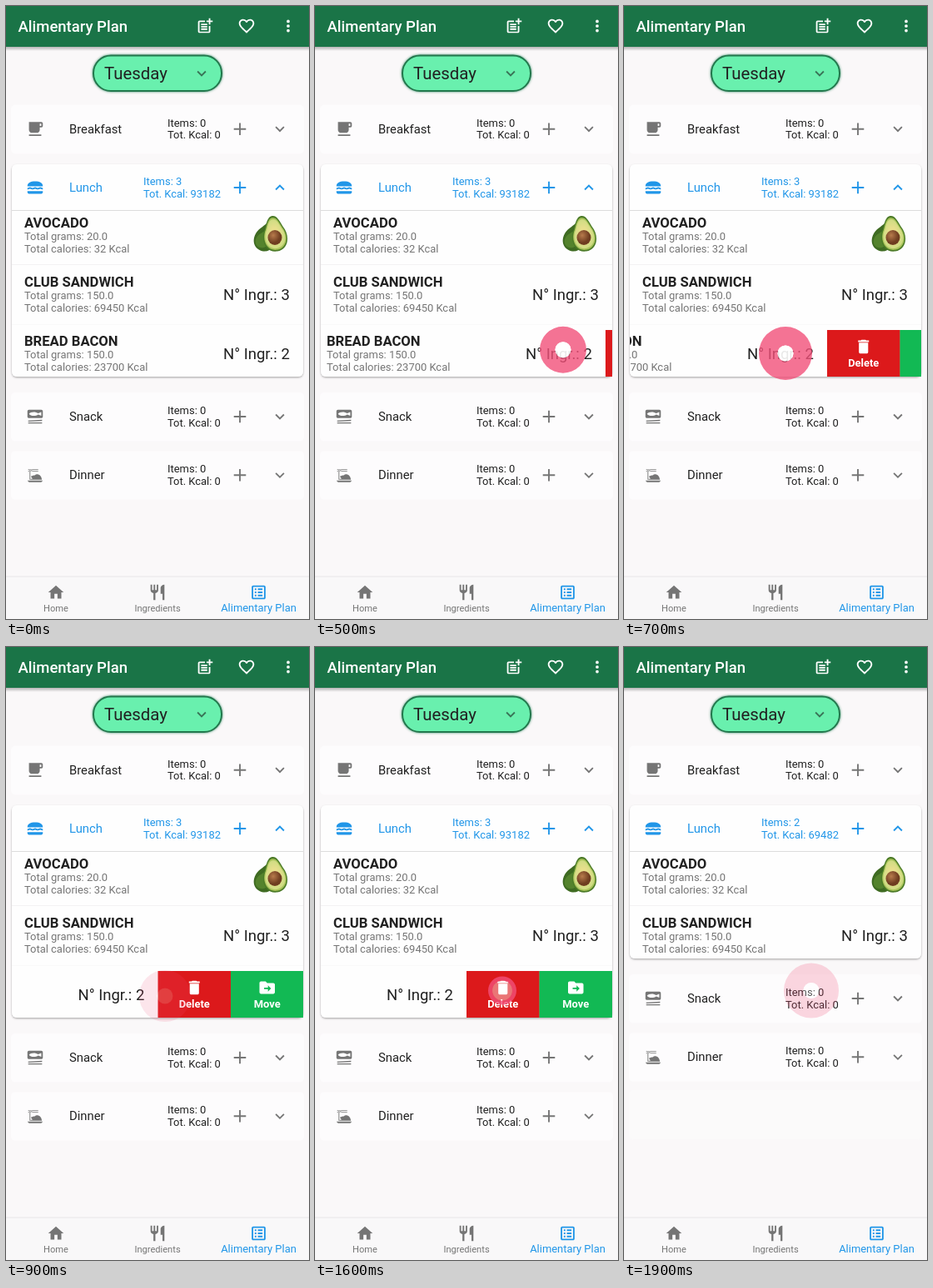
An HTML page for the animation above (2 s loop, 364 px wide and 736 px high).

```html
<!DOCTYPE html>
<html lang="en">
<head>
<meta charset="utf-8">
<title>Alimentary Plan</title>
<style>
  html, body { margin: 0; width: 100%; height: 100%; overflow: hidden; background: #faf8f9; }
  svg { display: block; width: 364px; height: 736px; font-family: Roboto, "Noto Sans", sans-serif; }
  .small { font-size: 12.95px; }
  .body { font-size: 14.8px; }
  .big { font-size: 18.5px; }
  .name { font-size: 16.65px; font-weight: 700; fill: #212121; }
  .action { font-size: 12.95px; font-weight: 700; fill: #fff; }
</style>
</head>
<body>
<svg id="stage" viewBox="0 0 364 736" xmlns="http://www.w3.org/2000/svg">
  <defs>
    <filter id="shadow" x="-10%" y="-10%" width="120%" height="125%">
      <feDropShadow dx="0" dy="1.2" stdDeviation="1.1" flood-opacity=".32"/>
    </filter>
    <filter id="glow" x="-10%" y="-25%" width="120%" height="150%">
      <feDropShadow dx="0" dy="0" stdDeviation="1.8" flood-color="#176b40" flood-opacity=".75"/>
    </filter>
    <linearGradient id="fade" x1="0" y1="0" x2="0" y2="1">
      <stop offset="0" stop-opacity=".28"/><stop offset="1" stop-opacity="0"/>
    </linearGradient>
    <radialGradient id="flesh">
      <stop offset=".4" stop-color="#e8df8c"/><stop offset="1" stop-color="#cfdc83"/>
    </radialGradient>
    <radialGradient id="pit" cx=".38" cy=".35">
      <stop offset="0" stop-color="#b87b4c"/><stop offset="1" stop-color="#6f3d20"/>
    </radialGradient>
    <clipPath id="rowClip"><rect x="7" y="382" width="350" height="63"/></clipPath>
  </defs>
</svg>
<script>
const STAGE = document.getElementById('stage');
const LOOP = 2000, STEP = 100, DELETED_AT = 1700, ROW = 71, PANE = 87.5;
const GRAY = '#757575', DARK = '#212121', BLUE = '#2196e8';

const ICONS = {
  note: 'M17 19.2H5V7h7V5H5c-1.1 0-2 .9-2 2v12c0 1.1.9 2 2 2h12c1.1 0 2-.9 2-2v-7h-2zM19 2h-2v3h-3v2h3v3h2V7h3V5h-3zM7 9h8v2H7zM7 12h8v2H7zM7 15h8v2H7z',
  heart: 'M16.5 3c-1.74 0-3.41.81-4.5 2.09C10.91 3.81 9.24 3 7.5 3 4.42 3 2 5.42 2 8.5c0 3.78 3.4 6.86 8.55 11.54L12 21.35l1.45-1.32C18.6 15.36 22 12.28 22 8.5 22 5.42 19.58 3 16.5 3zM12 18.6C7.14 14.24 4 11.39 4 8.5 4 6.5 5.5 5 7.5 5c1.54 0 3.04.99 3.57 2.36h1.87C13.46 5.99 14.96 5 16.5 5c2 0 3.5 1.5 3.5 3.5 0 2.89-3.14 5.74-8 10.1z',
  more: 'M10 6a2 2 0 1 0 4 0a2 2 0 1 0-4 0M10 12a2 2 0 1 0 4 0a2 2 0 1 0-4 0M10 18a2 2 0 1 0 4 0a2 2 0 1 0-4 0',
  cup: 'M20 3H4v10c0 2.2 1.8 4 4 4h6c2.2 0 4-1.8 4-4v-3h2c1.1 0 2-.9 2-2V5c0-1.1-.9-2-2-2zM20 8h-2V5h2zM4 19h16v2H4z',
  burger: 'M2 10.5C2 6 6 4 12 4s10 2 10 6.500zM2 12.500c1.700 0 1.700-1 3.300-1s1.700 1 3.400 1 1.700-1 3.300-1 1.700 1 3.300 1 1.700-1 3.400-1 1.700 1 3.300 1v2c-1.700 0-1.700-1-3.300-1s-1.700 1-3.400 1-1.700-1-3.300-1-1.700 1-3.300 1-1.700-1-3.400-1-1.700 1-3.300 1zM2 16.500h20V18c0 1.100-.9 2-2 2H4c-1.100 0-2-.9-2-2z',
  fish: 'M20 3H4c-1.100 0-2 .9-2 2v7c0 1.100.9 2 2 2h16c1.100 0 2-.9 2-2V5c0-1.100-.9-2-2-2zM4 8.500c2-3 8.500-3.500 12-.7L20 6v5l-4-1.800c-3.500 2.800-10 2.300-12-.7zM3 17l18-.9v1.500L3 18.500zM3 19.500h18V21H3z',
  bowl: 'M2 19h20l-2 2H4zM4.800 4h1v14h-1zM7 4h1v9H7zM3 4h13v1H3zM3 6.200h13v1H3zM7 7h1v6c1-.8 2.300-1 3.500-.8 2.500-2.700 8.500-1.500 9.300 5.800H6v-1.200h2.500c-.2-1-.7-1.800-1.500-2z',
  plus: 'M19 12.900h-6.100V19h-1.800v-6.100H5v-1.800h6.100V5h1.800v6.100H19z',
  down: 'M16.590 8.590L12 13.170 7.410 8.590 6 10l6 6 6-6z',
  up: 'M12 8l-6 6 1.410 1.410L12 10.830l4.590 4.580L18 14z',
  home: 'M10 20v-6h4v6h5v-8h3L12 3 2 12h3v8z',
  fork: 'M11 9H9V2H7v7H5V2H3v7c0 2.120 1.660 3.840 3.750 3.970V22h2.500v-9.030C11.340 12.840 13 11.120 13 9V2h-2zM16 6v8h2.500v8H21V2c-2.760 0-5 2.240-5 4z',
  list: 'M19 3H5c-1.100 0-2 .9-2 2v14c0 1.100.9 2 2 2h14c1.100 0 2-.9 2-2V5c0-1.100-.9-2-2-2zM19 19H5V5h14zM11 7h6v2h-6zM11 11h6v2h-6zM11 15h6v2h-6zM7 7h2v2H7zM7 11h2v2H7zM7 15h2v2H7z',
  trash: 'M6 19c0 1.100.9 2 2 2h8c1.100 0 2-.9 2-2V7H6zM19 4h-3.500l-1-1h-5l-1 1H5v2h14z',
  move: 'M20 6h-8l-2-2H4c-1.100 0-2 .9-2 2v12c0 1.100.9 2 2 2h16c1.100 0 2-.9 2-2V8c0-1.100-.9-2-2-2zM13 17v-3H8v-2h5V9l4 4z'
};

function add(parent, tag, attrs = {}, content) {
  const node = document.createElementNS(STAGE.namespaceURI, tag);
  for (const key in attrs) node.setAttribute(key, attrs[key]);
  if (content !== undefined) node.textContent = content;
  return parent.appendChild(node);
}
const group = (parent, attrs) => add(parent, 'g', attrs);
const rect = (parent, x, y, width, height, fill, more) =>
  add(parent, 'rect', { x, y, width, height, fill, ...more });
const label = (parent, x, y, content, cls, fill, more) =>
  add(parent, 'text', { x, y, class: cls, ...(fill && { fill }), ...more }, content);
const icon = (parent, name, x, y, fill, scale = .926) =>
  add(parent, 'path', { d: ICONS[name], fill, 'fill-rule': 'evenodd',
    transform: `translate(${x} ${y}) scale(${scale}) translate(-12 -12)` });

function meal(parent, y, symbol, name, open) {
  const main = open ? BLUE : GRAY, text = open ? BLUE : DARK, x = open ? 165 : 194;
  icon(parent, symbol, 35, y, main);
  label(parent, 76, y + 5, name, 'body', text);
  const items = label(parent, x, y - 2.9, 'Items: 0', 'small', text);
  const total = label(parent, x, y + 11.7, 'Tot. Kcal: 0', 'small', text);
  icon(parent, 'plus', 281, y, main, 1.04);
  icon(parent, open ? 'up' : 'down', 329, y, main);
  return { items, total };
}
function closedMeal(parent, y, symbol, name) {
  rect(parent, 6, y - 29, 352, 58.500, '#fdfcfd', { rx: 5 });
  meal(parent, y, symbol, name, false);
}
function food(parent, y, name, grams, calories, ingredients) {
  label(parent, 22, y, name, 'name');
  label(parent, 22, y + 15.400, `Total grams: ${grams}`, 'small', GRAY);
  label(parent, 22, y + 30.400, `Total calories: ${calories} Kcal`, 'small', GRAY);
  if (ingredients) label(parent, 261, y + 15.900, `N° Ingr.: ${ingredients}`, 'big', DARK);
}
function action(parent, x, fill, symbol, name) {
  rect(parent, x, 389, PANE + .3, 56, fill);
  icon(parent, symbol, x + PANE / 2, 409, '#fff');
  label(parent, x + PANE / 2, 432.500, name, 'action', null, { 'text-anchor': 'middle' });
}
function tab(x, symbol, name, size, fill) {
  icon(STAGE, symbol, x, 704, fill);
  label(STAGE, x, 727.300, name, '', fill, { 'font-size': size, 'text-anchor': 'middle' });
}
function avocado(parent) {
  const pear = 'M0-21C5-21 7-15 10-8C17 4 12 18 0 18S-17 4-10-8C-7-15-5-21 0-21z';
  const place = (x, y, turn, scale, fill) => add(parent, 'path', {
    d: pear, fill, transform: `translate(${x} ${y}) rotate(${turn}) scale(${scale})` });
  place(313, 277, 28, 1, '#3f6b22');
  place(309, 280, 34, .6, '#54832d');
  place(323, 275, -8, 1.1, '#4b7a27');
  place(323, 275, -8, 1, '#a9c45a');
  place(323, 275, -8, .9, 'url(#flesh)');
  add(parent, 'ellipse', { cx: 323, cy: 278, rx: 8.500, ry: 9, fill: 'url(#pit)' });
}

rect(STAGE, 0, 0, 364, 736, '#faf8f9');
rect(STAGE, 0, 49, 364, 5, 'url(#fade)');
rect(STAGE, 0, 0, 364, 49, '#1a7447');
label(STAGE, 14.500, 30.600, 'Alimentary Plan', 'big', '#fff', { 'font-weight': 500 });
icon(STAGE, 'note', 239, 24, '#fff');
icon(STAGE, 'heart', 289, 24, '#fff');
icon(STAGE, 'more', 339, 24, '#fff');

rect(STAGE, 105, 59.500, 154, 42.500, '#69f0ae', { rx: 21, stroke: '#23784d', 'stroke-width': 2, filter: 'url(#glow)' });
label(STAGE, 118, 87.600, 'Tuesday', '', DARK, { 'font-size': 20.400 });
icon(STAGE, 'down', 235, 81, '#397457');

closedMeal(STAGE, 147.700, 'cup', 'Breakfast');

const ghost = rect(STAGE, 6, 532, 352, 59.500, '#fbfafa', { rx: 5 });
const card = rect(STAGE, 7, 190, 350, 255, '#fefefe', { rx: 6, filter: 'url(#shadow)' });
const lunch = meal(STAGE, 218, 'burger', 'Lunch', true);
rect(STAGE, 7, 245, 350, 1, '#dcdcdc');
food(STAGE, 266, 'AVOCADO', '20.0', 32);
avocado(STAGE);
rect(STAGE, 7, 310, 350, 1, '#f3f2f3');
food(STAGE, 337, 'CLUB SANDWICH', '150.0', 69450, 3);

const lastRow = group(STAGE, { 'clip-path': 'url(#rowClip)' });
rect(lastRow, 7, 381, 350, 1.500, '#f3f2f3');
const slider = group(lastRow);
food(slider, 408, 'BREAD BACON', '150.0', 23700, 2);
action(slider, 357, '#dc191b', 'trash', 'Delete');
action(slider, 357 + PANE, '#12b954', 'move', 'Move');

const below = group(STAGE);
closedMeal(below, 493, 'fish', 'Snack');
closedMeal(below, 563.300, 'bowl', 'Dinner');

rect(STAGE, 0, 685, 364, 51, '#f9f8f9');
rect(STAGE, 0, 684.500, 364, 1, '#e9e8e9');
tab(60, 'home', 'Home', 11.100, GRAY);
tab(182, 'fork', 'Ingredients', 11.100, GRAY);
tab(303.500, 'list', 'Alimentary Plan', 12.950, BLUE);

const touch = group(STAGE);
const halo = add(touch, 'path', { fill: '#f2507a', 'fill-rule': 'evenodd', 'fill-opacity': .8 });
const dot = add(touch, 'circle', { fill: '#fff' });

// Linear interpolation through [time, value] points.
function track(t, points) {
  if (t <= points[0][0]) return points[0][1];
  for (let i = 1; i < points.length; i++) {
    const [t0, v0] = points[i - 1], [t1, v1] = points[i];
    if (t <= t1) return v0 + (v1 - v0) * (t - t0) / (t1 - t0);
  }
  return points[points.length - 1][1];
}
const disc = r => `M${-r} 0a${r} ${r} 0 1 0 ${2 * r} 0a${r} ${r} 0 1 0 ${-2 * r} 0z`;

function drawTouch(t) {
  const tapping = t >= 1600;
  const age = t - (tapping ? 1600 : 400);
  const x = tapping ? 225 : track(t, [[400, 336.500], [500, 298], [600, 239], [700, 194], [800, 191]]);
  const y = tapping ? 412.500 : track(t, [[400, 410.500], [600, 415], [800, 419]]);
  const released = t - (tapping ? 1700 : 700);
  const opacity = age < 0 ? 0 : Math.max(0, 1 - Math.max(0, released) * (tapping ? .0036 : .0041));
  const outer = tapping ? track(age, [[0, 17], [100, 35.300], [300, 33]])
                        : track(age, [[0, 17], [100, 28], [200, 32.500], [500, 31]]);
  const inner = track(age, [[0, 12], [100, 9.500]]);
  touch.setAttribute('transform', `translate(${x} ${y})`);
  touch.setAttribute('opacity', opacity);
  halo.setAttribute('d', disc(outer) + disc(inner));
  dot.setAttribute('r', inner);
  dot.setAttribute('fill-opacity', track(age, [[0, .4], [100, .9]]));
}

function render(now) {
  const t = Math.floor(now % LOOP / STEP) * STEP;
  const deleted = t >= DELETED_AT;
  const swipe = track(t, [[400, 0], [500, -8], [600, -67], [700, -113], [800, -158], [900, -174.500], [1000, -2 * PANE]]);
  slider.setAttribute('transform', `translate(${swipe} 0)`);
  lastRow.setAttribute('visibility', deleted ? 'hidden' : 'visible');
  ghost.setAttribute('visibility', deleted ? 'visible' : 'hidden');
  below.setAttribute('transform', `translate(0 ${deleted ? -ROW : 0})`);
  card.setAttribute('height', deleted ? 255 - ROW : 255);
  lunch.items.textContent = `Items: ${deleted ? 2 : 3}`;
  lunch.total.textContent = `Tot. Kcal: ${deleted ? 69482 : 93182}`;
  drawTouch(t);
}

let start;
function tick(now) {
  start ??= now;
  render(now - start);
  requestAnimationFrame(tick);
}
render(0);
requestAnimationFrame(tick);
</script>
</body>
</html>
```
